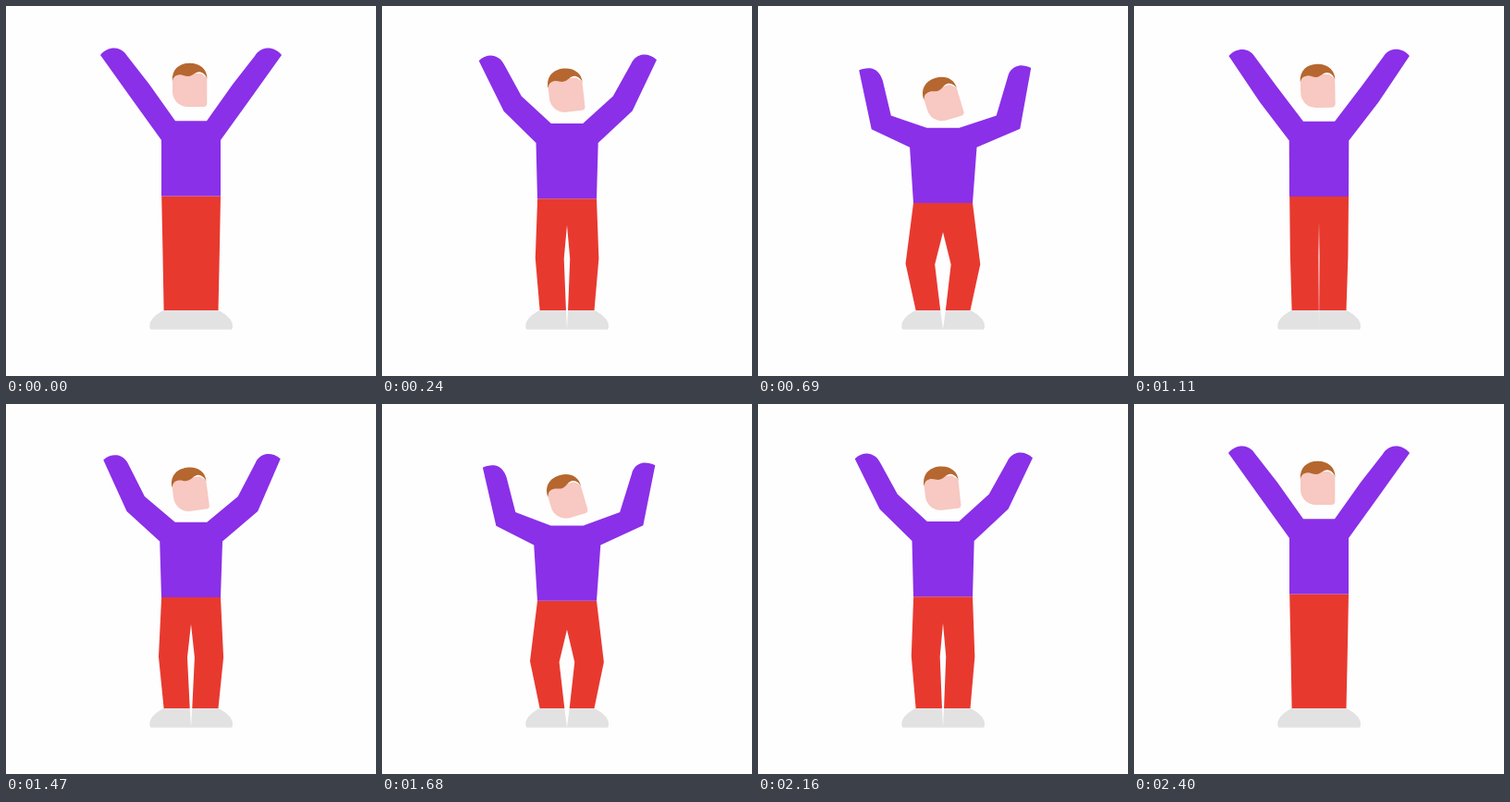
An HTML page for the animation above (4430 ms loop, 400x400 px).

```html
<!DOCTYPE html>
<html lang="en">
<head>
<meta charset="utf-8">
<title>Arm raise squat</title>
<style>
  html, body { margin: 0; width: 100%; height: 100%; overflow: hidden; background: #fefefe; }
  svg { display: block; width: 100%; height: 100%; }
</style>
</head>
<body>
<svg viewBox="0 0 400 400">
  <path id="shoes" fill="#e2e2e2"/>
  <path id="legs" fill="#e8392f"/>
  <path id="shirt" fill="#8a30e8"/>
  <g id="head">
    <path fill="#f8c8c2" d="M180 79 L187 73 H211 L217.3 78 V105 Q217.3 109 213.3 109 H196.5 A16.5 16.5 0 0 1 180 92.5 Z"/>
    <path fill="#b5672f" d="M179.8 81 C179 69 187 61.8 198.5 61.8 C210 61.8 217.8 69 217.4 78.8 C216 74.5 212.5 71.5 209 71.3 C204.5 71.3 201.5 76 197 76 C193.5 76 191 74 187.5 74.2 C183.5 74.5 181 77 179.8 81 Z"/>
  </g>
</svg>
<script>
const LOOP = 4430, STEP = 30, HALF = 600, ACTIVE = 2400;

// Each shape: path when upright, path when fully bent
const shapes = {
  shirt: [
    `M168 205.5 L168 145 L137 102 L102 53
     C106 47.8 112 45.3 117.5 45.5 C123 45.8 128 49 131 54
     L155 84.8 L183 124.2 L217 124.2 L245 84.8 L269 54
     C272 49 277 45.8 282.5 45.5 C288 45.3 294 47.8 298 53
     L263 102 L232 145 L232 205.5 Z`,
    `M168 213.5 L163.8 153.3 L121.8 135.2 L109.7 70.5
     C112.5 69.2 116.7 68.3 121.6 68.6 C128.3 69.5 132.7 74.5 135.1 82.4
     L143.1 120.6 L182.5 132.3 L217.6 132.3 L258.5 120.6 L270.2 77.7
     C271.4 70.9 277 66.2 282.5 65.6 C286.8 65.3 291 66.2 295 67.8
     L284.6 134.7 L236.8 153.3 L232 213.5 Z`
  ],
  legs: [
    `M168.2 205.5 L232 205.5 L230.8 269.5 L229.5 329
     L200 329 L200 269.5 L200 232.6 L200 269.5 L200 329 L170.6 329 L169.5 269 Z`,
    `M168 213.5 L232 213.5 L240.9 280 L229.5 329
     L203 329 L209.2 280.2 L200 245.3 L190.6 280.2 L197 329 L170.6 329 L158.9 279 Z`
  ],
  shoes: [
    `M170.5 329 C163 332.5 155.3 339 155.3 345.5 C155.3 347.5 155.8 349 156.5 349.8
     L200 349.8 L244 349.8 C244.7 349 245 347.5 245 345.5 C245 339 237 332.5 229.5 329
     L200 329 L200 349.5 L200 329 Z`,
    `M170.5 329 C163 332.5 155.3 339 155.3 345.5 C155.3 347.5 155.8 349 156.5 349.8
     L200 349.8 L244 349.8 C244.7 349 245 347.5 245 345.5 C245 339 237 332.5 229.5 329
     L203 329 L200 349.5 L197 329 Z`
  ]
};

const number = /[\d.]+/g;
const byId = id => document.getElementById(id);

function morph([from, to], p) {
  const ends = to.match(number);
  let i = 0;
  return from.replace(number, n => (+n + (ends[i++] - n) * p).toFixed(2));
}

// 0 upright, 1 bent: two down-and-up cycles, then rest
function bend(ms) {
  const t = Math.floor((ms % LOOP) / STEP) * STEP;
  if (t >= ACTIVE) return 0;
  const phase = t % (2 * HALF) / HALF;
  const u = phase > 1 ? 2 - phase : phase;
  return u * u * (3 - 2 * u);
}

function draw(ms) {
  const p = bend(ms);
  for (const id in shapes) byId(id).setAttribute("d", morph(shapes[id], p));
  byId("head").setAttribute("transform",
    `translate(${0.2 * p} ${16 * p}) rotate(${-18 * p} 198.5 85.5)`);
}

const start = performance.now();
function tick() {
  draw(performance.now() - start);
  requestAnimationFrame(tick);
}
tick();
</script>
</body>
</html>
```
